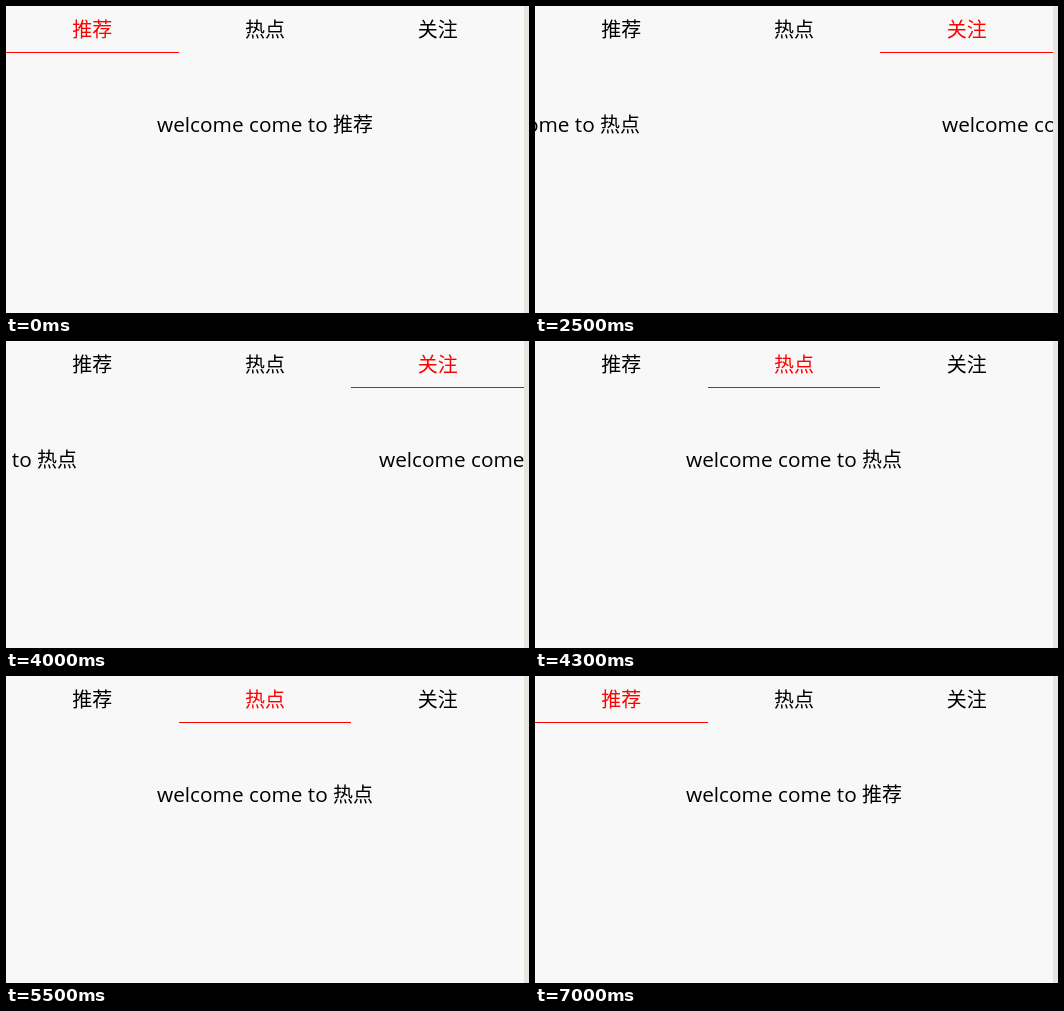
An HTML page for the animation above (8400 ms loop, 523 px wide and 307 px high).

```html
<!DOCTYPE html>
<html lang="zh-CN">
<head>
<meta charset="utf-8">
<title>Swipe tabs</title>
<style>
  html, body { margin: 0; width: 100%; height: 100%; overflow: hidden; background: #f8f8f8; }
  svg { display: block; }
  text { font: 20px "Noto Sans CJK SC", "Noto Sans CJK", sans-serif; white-space: pre; }
  .latin { font: 20.8px "Open Sans", "Noto Sans", sans-serif; }
</style>
</head>
<body>
<svg id="stage" width="523" height="307" viewBox="0 0 523 307">
  <clipPath id="view"><rect width="518" height="307"/></clipPath>
  <rect width="523" height="307" fill="#f8f8f8"/>
  <g id="tabs"></g>
  <rect id="bar" y="46" height="1" fill="#f00"/>
  <g clip-path="url(#view)"><g id="pages"></g></g>
  <rect x="518" width="5" height="307" fill="#e6e6de"/>
</svg>
<script>
const LOOP = 8400, STEP = 100, WIDTH = 518, SETTLE = 280;
const labels = ['推荐', '热点', '关注'];
const $ = id => document.getElementById(id);

function add(parent, name, attrs, content = '') {
  const node = document.createElementNS('http://www.w3.org/2000/svg', name);
  for (const key in attrs) node.setAttribute(key, attrs[key]);
  node.textContent = content;
  return parent.appendChild(node);
}

const tabs = labels.map((label, i) =>
  add($('tabs'), 'text', { x: WIDTH / 3 * (i + 0.5), y: 31, 'text-anchor': 'middle' }, label));

labels.forEach((label, i) => {
  const line = add($('pages'), 'text', { y: 126 });
  add(line, 'tspan', { x: 151 + i * WIDTH, class: 'latin' }, 'welcome come to ');
  add(line, 'tspan', { x: 327 + i * WIDTH }, label);
});

// cubic-bezier(.25, .1, .25, 1)
function ease(x) {
  const curve = (s, a, b) => 3 * s * (1 - s) ** 2 * a + 3 * s * s * (1 - s) * b + s ** 3;
  let lo = 0, hi = 1;
  for (let i = 0; i < 24; i++) {
    const mid = (lo + hi) / 2;
    if (curve(mid, 0.25, 0.25) < x) lo = mid; else hi = mid;
  }
  return curve(lo, 0.1, 1);
}
const drag = u => 1 - (1 - u) ** 2;

// Each move: start, duration, scroll target, easing, active tab
const moves = [
  [1017, SETTLE, WIDTH, ease, 1],
  [2417, SETTLE, WIDTH * 2, ease, 2],
  [3630, 387, WIDTH * 2 - 222, drag, 2],
  [4017, SETTLE, WIDTH, ease, 1],
  [4950, 267, WIDTH - 175, drag, 1],
  [5217, SETTLE, WIDTH, ease, 1],
  [6550, 167, WIDTH - 175, drag, 1],
  [6717, SETTLE, 0, ease, 0]
];

function render(ms) {
  const t = Math.floor(ms % LOOP / STEP) * STEP;
  let scroll = 0, active = 0;
  for (const [start, length, target, easing, tab] of moves) {
    if (t < start) break;
    const u = Math.min(1, (t - start) / length);
    scroll += (target - scroll) * (u < 1 ? easing(u) : 1);
    active = tab;
  }
  $('pages').setAttribute('transform', `translate(${-Math.round(scroll)} 0)`);
  tabs.forEach((tab, i) => tab.setAttribute('fill', i === active ? '#f00' : '#000'));
  const left = Math.round(active * WIDTH / 3);
  $('bar').setAttribute('x', left);
  $('bar').setAttribute('width', Math.round((active + 1) * WIDTH / 3) - left);
}

const begin = performance.now();
function tick() {
  render(performance.now() - begin);
  requestAnimationFrame(tick);
}
tick();
</script>
</body>
</html>
```
